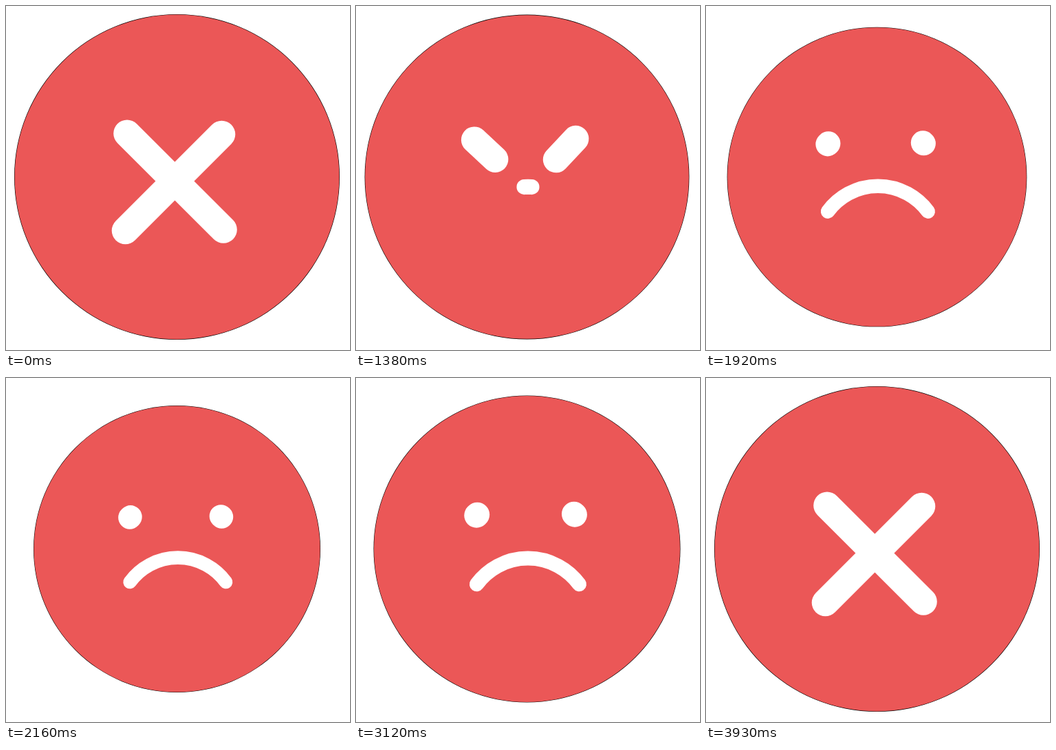
An HTML page that plays this animation: 500x500 px, repeating every 4.89 s.

```html
<!DOCTYPE html>
<html lang="en">
<head>
<meta charset="utf-8">
<title>Cross to sad face</title>
<style>
  html, body { margin: 0; width: 100%; height: 100%; overflow: hidden; background: #fff; }
  svg { display: block; width: 100vw; height: 100vh; }
  .ink { fill: none; stroke: #fff; stroke-linecap: round; }
</style>
</head>
<body>
<svg viewBox="0 0 500 500">
  <g id="badge">
    <circle r="236.5" fill="#000"/>
    <circle r="235.9" fill="#eb5757"/>
    <path id="mouth" class="ink" stroke-width="22.3"/>
    <line id="left" class="ink"/>
    <line id="right" class="ink"/>
  </g>
</svg>
<script>
const LOOP = 4890, STEP = 30;
const CENTER = 248.5;
const MIN_SCALE = 0.86;
const MOUTH = { x: 1.5, y: 112.4, r: 98, spread: 0.938 };

// Line ends [x1, y1, x2, y2] relative to the disc centre
const BARS = {
  left:  { cross: [-72.5, -63.3, 67.5, 76.5],  eye: [-77.8, -51.7, -76.6, -52.9] },
  right: { cross: [65, -62, -75, 78],          eye: [72.5, -54, 73.7, -52.8] }
};

const $ = id => document.getElementById(id);
const lerp = (a, b, k) => a + (b - a) * k;
const clamp = k => Math.min(1, Math.max(0, k));
const ease = (t, from, to) => (1 - Math.cos(Math.PI * clamp((t - from) / (to - from)))) / 2;

// Rises over [a, b], falls back over [c, d]
const pulse = (t, a, b, c, d) => ease(t, a, b) - ease(t, c, d);

function drawBar(id, k) {
  const { cross, eye } = BARS[id];
  const line = $(id);
  ["x1", "y1", "x2", "y2"].forEach((name, i) => line.setAttribute(name, lerp(cross[i], eye[i], k)));
  line.setAttribute("stroke-width", lerp(39.6, 38, k));
}

function drawMouth(k) {
  const { x, y, r, spread } = MOUTH;
  const dx = r * Math.sin(spread * k), dy = r * Math.cos(spread * k);
  $("mouth").setAttribute("d", k > 0.001
    ? `M${x - dx} ${y - dy}A${r} ${r} 0 0 1 ${x + dx} ${y - dy}` : "");
}

function draw(time) {
  const t = Math.floor((time % LOOP) / STEP) * STEP;
  const moving = t >= 1080 && t < 3930;
  const scale = lerp(1, MIN_SCALE, pulse(t, 1280, 2465, 2480, 3625));
  $("badge").setAttribute("transform", `translate(${CENTER} ${CENTER}) scale(${scale})`);
  const k = moving ? pulse(t, 1035, 1530, 3430, 3930) : 0;
  drawBar("left", k);
  drawBar("right", k);
  drawMouth(pulse(t, 1330, 1650, 3320, 3640));
}

const start = performance.now();
function tick() {
  draw(performance.now() - start);
  requestAnimationFrame(tick);
}
tick();
</script>
</body>
</html>
```
